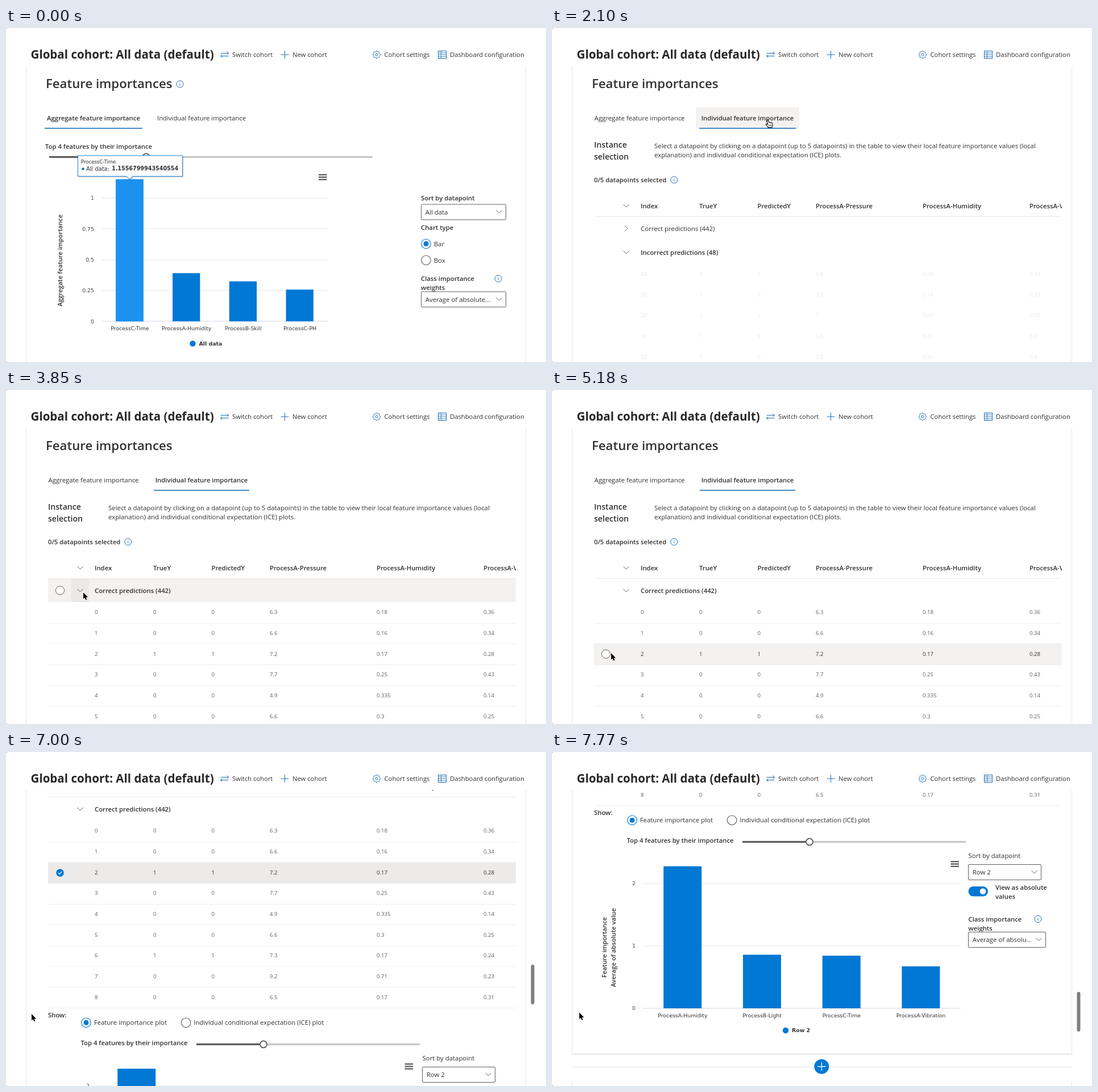
Recreate the animation shown at these times as an HTML page with a canvas. Size 950x589 px, loop 8000 ms.

```html
<!DOCTYPE html>
<html lang="en">
<head>
<meta charset="utf-8">
<title>Feature importances</title>
<style>
html, body { margin: 0; width: 100%; height: 100%; overflow: hidden; background: #fff; }
canvas { display: block; width: 950px; height: 589px; }
</style>
</head>
<body>
<canvas id="stage"></canvas>
<script>
const W = 950, H = 589, LOOP = 8000, STEP = 70;
const canvas = document.getElementById('stage');
const c = canvas.getContext('2d');
const dpr = window.devicePixelRatio || 1;
canvas.width = W * dpr;
canvas.height = H * dpr;

const UI = '"Open Sans", "Noto Sans", sans-serif';
const CHART = '"DejaVu Sans", sans-serif';
const INK = '#323130', GREY = '#605e5c', BLUE = '#0078d4', LINK = '#1f6fb5', RULE = '#efeeed', HOVER = '#f3f2f1';

const clamp = (v, a = 0, b = 1) => Math.min(b, Math.max(a, v));

// Piecewise motion through [time, ...values] keys.
function track(keys, t, ease) {
  let i = 0;
  while (i < keys.length - 2 && t >= keys[i + 1][0]) i++;
  const a = keys[i], b = keys[i + 1];
  let k = clamp((t - a[0]) / (b[0] - a[0]));
  if (ease) k = k * k * (3 - 2 * k);
  return a.slice(1).map((v, n) => v + (b[n + 1] - v) * k);
}

const POINTER = [
  [210, 480, 600], [980, 380, 162], [2200, 380, 162], [2870, 135, 384],
  [2940, 135, 384], [3290, 136, 357], [3920, 136, 357], [4200, 137, 420],
  [4760, 133, 457.5], [4900, 133, 457.5], [5180, 104, 464], [5530, 102, 464],
  [5810, 102, 464], [5950, 97, 464], [6090, 97, 464], [6440, 45, 462],
  [7140, 45, 462], [7350, 48, 459.5], [8000, 48, 459.5]
];
const SCROLL = [
  [6720, 0], [6790, 18], [6860, 88], [6930, 178], [7000, 253], [7070, 277],
  [7140, 277], [7210, 292], [7350, 378], [7490, 469], [7630, 553], [7700, 588], [7770, 610], [8000, 610]
];

const COLS = [156, 259, 361.5, 464, 652, 840];
const parse = s => s.split('|').map(r => r.split(' '));
const WRONG = parse('24 0 1 5.8 0.29 0.33|28 1 0 7.6 0.19 0.32|29 0 1 7 0.29 0.35|39 1 0 6.6 0.25 0.3|42 1 0 7.5 0.26 0.3');
const RIGHT = parse('0 0 0 6.3 0.18 0.36|1 0 0 6.6 0.16 0.34|2 1 1 7.2 0.17 0.28|3 0 0 7.7 0.25 0.43|' +
  '4 0 0 4.9 0.335 0.14|5 0 0 6.6 0.3 0.25|6 1 1 7.3 0.17 0.24|7 0 0 9.2 0.71 0.23|8 0 0 6.5 0.17 0.31');
const ROW = 36.7;

function text(s, x, y, { size = 11.4, weight = 400, color = INK, align = 'left', font = UI } = {}) {
  c.font = `${weight} ${size}px ${font}`;
  c.fillStyle = color;
  c.textAlign = align;
  c.fillText(s, x, y + size * 0.36);
}
const bold = (s, x, y, o) => text(s, x, y, { size: 11.3, weight: 600, ...o });

function upright(s, x, y) {
  c.save();
  c.translate(x, y);
  c.rotate(-Math.PI / 2);
  bold(s, 0, 0, { size: 11.2, align: 'center' });
  c.restore();
}

function box(x, y, w, h, color) {
  c.fillStyle = color;
  c.fillRect(x, y, w, h);
}

function line(pts, color, width = 1) {
  c.beginPath();
  pts.forEach(([x, y]) => c.lineTo(x, y));
  c.strokeStyle = color;
  c.lineWidth = width;
  c.stroke();
}

function disc(x, y, r, fill, stroke, width = 1) {
  c.beginPath();
  c.arc(x, y, r, 0, 7);
  if (fill) { c.fillStyle = fill; c.fill(); }
  if (stroke) { c.strokeStyle = stroke; c.lineWidth = width; c.stroke(); }
}

function chevron(x, y, open = true) {
  line(open ? [[x - 5, y - 2.5], [x, y + 2.5], [x + 5, y - 2.5]]
            : [[x - 2.5, y - 5], [x + 2.5, y], [x - 2.5, y + 5]], GREY);
}

function info(x, y, r = 6) {
  disc(x, y, r, null, LINK);
  box(x - 0.5, y - 0.8, 1, r * 0.6, LINK);
  box(x - 0.5, y - r * 0.5, 1, 1.1, LINK);
}

function radio(x, y, on, label) {
  disc(x, y, 8.3, '#fff', on ? BLUE : GREY, 1.1);
  if (on) disc(x, y, 4.5, BLUE);
  text(label, x + 13.7, y);
}

function dropdown(x, y, w, label) {
  c.strokeStyle = GREY;
  c.lineWidth = 1;
  c.beginPath();
  c.roundRect(x + 0.5, y + 0.5, w - 1, 27, 1.5);
  c.stroke();
  text(label, x + 7.8, y + 14);
  chevron(x + w - 12.5, y + 13.5);
}

function slider(x0, x1, knob, y) {
  box(x0, y - 1.6, x1 - x0, 3.2, '#c8c6c4');
  box(x0, y - 1.6, knob - x0, 3.2, GREY);
  disc(knob, y, 6, '#fff', GREY, 1.8);
}

function burger(x, y) {
  for (let i = -1; i < 2; i++) box(x - 7, y + i * 4.2 - 1.1, 14.5, 2.2, '#555');
}

function chart({ x0, x1, base, gap, ticks, tickX, bars, names, width, first, lit }) {
  const slot = (x1 - x0) / 4;
  ticks.forEach((s, i) => {
    const y = base - gap * i;
    box(x0, Math.round(y) - 0.5, x1 - x0, 1, i ? '#e6e6e6' : '#d4d8e4');
    text(s, tickX, y, { size: 9.35, color: '#444', align: 'right', font: CHART });
  });
  bars.forEach((h, i) => {
    box(first + slot * i, base - h, width, h, BLUE);
    if (!i && lit) {
      c.globalAlpha = lit;
      box(first, base - h, width, h, '#1d91f0');
      c.globalAlpha = 1;
    }
    text(names[i], x0 + slot * (i + 0.5), base + 12.5, { size: 9.35, color: '#333', align: 'center', font: CHART });
  });
}

function legend(x, y, s) {
  disc(x, y, 5.2, BLUE);
  text(s, x + 11, y, { size: 9.4, weight: 700, color: '#333', font: CHART });
}

function tooltip(alpha) {
  if (!alpha) return;
  c.save();
  c.globalAlpha = alpha;
  c.beginPath();
  [[126.5, 225], [310.5, 225], [310.5, 261.5], [223, 261.5], [217.5, 266.5], [212, 261.5], [126.5, 261.5]]
    .forEach(([x, y]) => c.lineTo(x, y));
  c.closePath();
  c.shadowColor = 'rgba(0,0,0,.3)';
  c.shadowBlur = 3 * dpr;
  c.shadowOffsetX = c.shadowOffsetY = dpr;
  c.fillStyle = '#fcfcfc';
  c.fill();
  c.shadowColor = 'transparent';
  c.strokeStyle = '#1d86dc';
  c.lineWidth = 1;
  c.stroke();
  const o = { color: '#333', font: CHART };
  text('ProcessC-Time', 132, 236, { ...o, size: 8.5 });
  disc(135.5, 248.5, 2.2, BLUE);
  text('All data:', 141, 248, { ...o, size: 9.9 });
  text('1.1556799943540554', 186, 248, { ...o, size: 9.6, weight: 700 });
  c.restore();
}

function icons() {
  const arrow = (y, d) => {
    line([[384.5 - 7, y], [384.5 + 7, y]], LINK);
    const x = 384.5 + 7 * d;
    line([[x - 3 * d, y - 3], [x, y], [x - 3 * d, y + 3]], LINK);
  };
  arrow(44.5, 1);
  arrow(49.5, -1);
  line([[483.5, 47], [497.5, 47]], LINK);
  line([[490.5, 40], [490.5, 54]], LINK);

  const teeth = [];
  for (let i = 0; i <= 32; i++) {
    const a = (i - 0.5) / 32 * Math.PI * 2, r = i % 4 < 2 ? 6.8 : 5.2;
    teeth.push([652 + r * Math.cos(a), 47 + r * Math.sin(a)]);
  }
  line(teeth, LINK, 0.9);
  disc(652, 47, 2.3, null, LINK, 0.9);

  c.strokeStyle = LINK;
  c.lineWidth = 1;
  c.strokeRect(760.5, 40.5, 14, 13);
  [43.8, 47, 50.3].forEach(y => line([[760.5, y], [774.5, y]], LINK, 0.8));
  line([[765.5, 40.5], [765.5, 53.5]], LINK, 0.8);
}

function header() {
  box(0, 0, W, 67, '#fff');
  text('Global cohort: All data (default)', 43.5, 46.7, { size: 20.55, weight: 700, color: '#292827' });
  const o = { size: 11.25 };
  text('Switch cohort', 398, 47.3, o);
  text('New cohort', 504, 47.3, o);
  text('Cohort settings', 665.5, 47.3, o);
  text('Dashboard configuration', 781, 47.3, o);
  icons();
  box(0, 0, 1, 1, '#666');
  box(0, 588, 1, 1, '#666');
}

function tabs(individual, t, p) {
  const over = t >= 1540 && p.x > 253 && p.x < 435 && p.y > 140 && p.y < 177;
  if (over) box(253, 140, 182, 37, HOVER);
  const mid = { align: 'center' };
  const a = 'Aggregate feature importance', b = 'Individual feature importance';
  if (individual) {
    text(a, 154, 159.3, mid);
    bold(b, 344, 159.3, mid);
    const grow = over ? 1 : 0;
    box(260 - grow, 176, 168 + 2 * grow, 1.6, LINK);
  } else {
    bold(a, 154, 159.3, mid);
    text(b, 344, 159.3, { ...mid, size: 11.3, color: over ? '#201f1e' : INK });
    box(68, 176, 172, 1.6, LINK);
  }
}

function aggregate(t) {
  info(306, 99);
  bold('Top 4 features by their importance', 69, 208.5);
  slider(76, 645, 246.5, 227.5);
  const glow = 1 - clamp((t - 340) / 280);
  burger(557, 263);
  chart({
    x0: 168, x1: 567, base: 517.3, gap: 54.3, ticks: ['0', '0.25', '0.5', '0.75', '1'], tickX: 155,
    bars: [250.5, 85, 70.5, 56], names: ['ProcessC-Time', 'ProcessA-Humidity', 'ProcessB-Skill', 'ProcessC-PH'],
    width: 48.3, first: 193.3, lit: glow
  });
  upright('Aggregate feature importance', 95, 410);
  legend(328.5, 556.5, 'All data');

  bold('Sort by datapoint', 730, 299.5);
  dropdown(730, 310.5, 150, 'All data');
  bold('Chart type', 730, 351.5);
  radio(739, 380.5, true, 'Bar');
  radio(739, 409.5, false, 'Box');
  bold('Class importance', 730, 442);
  bold('weights', 730, 458);
  info(866, 442);
  dropdown(730, 464.5, 150, 'Average of absolute...');
  tooltip(glow);
}

function group(label, y, open, p) {
  const over = p.x > 74 && p.x < 897 && p.y >= y - 20.5 && p.y < y + 20.5;
  if (over) {
    box(74, y - 20.5, 823, 41, HOVER);
    if (p.x > 115 && p.x < 146) box(115, y - 20.5, 31, 41, '#eae9e8');
    disc(95, y, 7.6, '#fff', GREY);
  }
  chevron(130.5, y, open);
  (open ? bold : text)(label, 156, y + 0.3);
}

function rows(data, top, alpha, p, picked) {
  c.globalAlpha = alpha;
  data.forEach((cells, i) => {
    const y = top + ROW * i;
    const over = p.x > 74 && p.x < 897 && p.y >= y - 17 && p.y < y + 19.5;
    const on = i === picked;
    if (on || over) box(74, Math.round(y - 17.2), 823, 37, on ? (over ? '#e6e4e2' : '#edebe9') : HOVER);
    box(74, Math.round(y + 18.8), 823, 1, RULE);
    if (on) {
      disc(95, y + 1, 6.8, BLUE);
      line([[92, y + 1.2], [94.2, y + 3.2], [98.2, y - 1]], '#fff', 1.2);
    } else if (over) disc(95, y + 0.5, 7.6, '#fff', GREY);
    cells.forEach((s, n) => text(s, COLS[n], y, { size: 9.6, color: on || over ? INK : GREY }));
  });
  c.globalAlpha = 1;
}

function table(t, p) {
  c.save();
  c.beginPath();
  c.rect(36, 300, 861, 406);
  c.clip();
  chevron(130.5, 313.5);
  ['Index', 'TrueY', 'PredictedY', 'ProcessA-Pressure', 'ProcessA-Humidity', 'ProcessA-Vibration']
    .forEach((s, i) => bold(s, COLS[i], 314));
  box(74, 332, 823, 1, '#ebeae9');
  const open = t >= 3430;
  group('Correct predictions (442)', 353.5, open, p);
  if (open) {
    rows(RIGHT, 391.7, clamp((t - 3390) / 367), p, t >= 5740 ? 2 : -1);
  } else {
    group('Incorrect predictions (48)', 395.5, true, p);
    rows(WRONG, 433.6, clamp((t - 2050) / 367), p, -1);
  }
  c.restore();
}

function plot() {
  bold('Show:', 74, 717.3);
  radio(141, 730.3, true, 'Feature importance plot');
  radio(316.5, 730.3, false, 'Individual conditional expectation (ICE) plot');
  bold('Top 4 features by their importance', 131.5, 765.5);
  slider(335, 728, 453, 768.5);
  burger(708.5, 807.5);
  chart({
    x0: 160, x1: 719, base: 1062, gap: 110, ticks: ['0', '1', '2'], tickX: 147,
    bars: [250.5, 94.5, 92.8, 74], names: ['ProcessA-Humidity', 'ProcessB-Light', 'ProcessC-Time', 'ProcessA-Vibration'],
    width: 67, first: 196.2
  });
  upright('Feature importance', 91.5, 954.5);
  upright('Average of absolute value', 107.5, 955);
  legend(411, 1101, 'Row 2');

  text('Sort by datapoint', 732.5, 793);
  dropdown(732, 808, 129, 'Row 2');
  c.fillStyle = BLUE;
  c.beginPath();
  c.roundRect(732.5, 847, 34.5, 17.5, 9);
  c.fill();
  disc(758, 855.8, 5.3, '#fff');
  bold('View as absolute', 780, 849);
  bold('values', 780, 865);
  bold('Class importance', 732.5, 904.5);
  bold('weights', 732.5, 920.5);
  info(855, 904.5);
  dropdown(732, 927, 137, 'Average of absolu...');

  box(36, 1142, 878, 1, '#dcdbda');
  box(36, 1143, 878, 1, '#efeeee');
  box(36, 1165, 878, 1, '#e6e5e4');
  disc(474.3, 1164.7, 13, BLUE);
  line([[467, 1164.7], [481.6, 1164.7]], '#fff', 1.3);
  line([[474.3, 1157.4], [474.3, 1172]], '#fff', 1.3);
}

function sides() {
  [[60, 1143], [1190, 1300]].forEach(([a, b]) => {
    box(35, a, 1, b - a, '#e9e8e7');
    box(914, a, 1, b - a, '#e9e8e7');
  });
}

function arrowCursor(x, y) {
  c.beginPath();
  [[0, 0], [0, 11.6], [2.6, 9.3], [4.4, 13.3], [6.3, 12.5], [4.6, 8.6], [8.2, 8.5]]
    .forEach(([a, b]) => c.lineTo(x + a, y + b));
  c.closePath();
  c.strokeStyle = '#fff';
  c.lineWidth = 1.8;
  c.stroke();
  c.fillStyle = '#000';
  c.fill();
}

function handCursor(x, y) {
  c.save();
  c.translate(x, y);
  c.beginPath();
  c.moveTo(-1.8, 1);
  c.quadraticCurveTo(-1, -1.2, 0.6, 0.4);
  c.lineTo(1.8, 4.8);
  c.quadraticCurveTo(3, 3.6, 4, 5);
  c.quadraticCurveTo(5.2, 4.1, 6, 5.4);
  c.quadraticCurveTo(7.8, 5, 8, 7);
  c.quadraticCurveTo(8.2, 10, 6.8, 13.6);
  c.lineTo(0.4, 13.6);
  c.quadraticCurveTo(-1.5, 10.5, -4, 8.2);
  c.quadraticCurveTo(-3.4, 6.2, -0.4, 8);
  c.closePath();
  c.fillStyle = '#fff';
  c.fill();
  c.strokeStyle = '#000';
  c.lineWidth = 1.1;
  c.lineJoin = 'round';
  c.stroke();
  [1.6, 3.6, 5.5].forEach(a => line([[a, 8.3], [a, 11.3]], '#000', 0.8));
  c.restore();
}

function draw(t) {
  const [x, y] = track(POINTER, t, true);
  const [scroll] = track(SCROLL, t);
  const p = { x, y: y + scroll };
  const individual = t >= 2100;

  c.setTransform(dpr, 0, 0, dpr, 0, 0);
  c.textBaseline = 'alphabetic';
  box(0, 0, W, H, '#fff');
  c.save();
  c.beginPath();
  c.rect(0, 67, W, H - 67);
  c.clip();
  c.translate(0, -Math.round(scroll));
  sides();
  bold('Feature importances', 70, 98.3, { size: 22.2 });
  tabs(individual, t, p);
  if (individual) {
    bold('Instance', 74, 206.3, { size: 14.1 });
    bold('selection', 74, 226.6, { size: 14.1 });
    text('Select a datapoint by clicking on a datapoint (up to 5 datapoints) in the table to view their local feature importance values (local', 180, 208.3);
    text('explanation) and individual conditional expectation (ICE) plots.', 180, 224);
    const one = t >= 5740;
    bold(`${one ? 1 : 0}/5 datapoints selected`, 74, 267.5);
    info(one ? 213 : 214.7, 267.7);
    table(t, p);
    if (one) plot();
  } else aggregate(t);
  c.restore();
  header();

  if (t >= 6790) {
    c.fillStyle = '#7f7f7f';
    c.beginPath();
    c.roundRect(923.5, 341 + scroll * 0.1345, 6, 70, 3);
    c.fill();
  }
  if (t >= 1540 && y < 177) handCursor(x, y);
  else if (t >= 280) arrowCursor(x, y);
}

const start = performance.now();
function tick() {
  const t = (performance.now() - start) % LOOP;
  draw(Math.floor(t / STEP) * STEP);
  requestAnimationFrame(tick);
}
tick();
</script>
</body>
</html>
```
